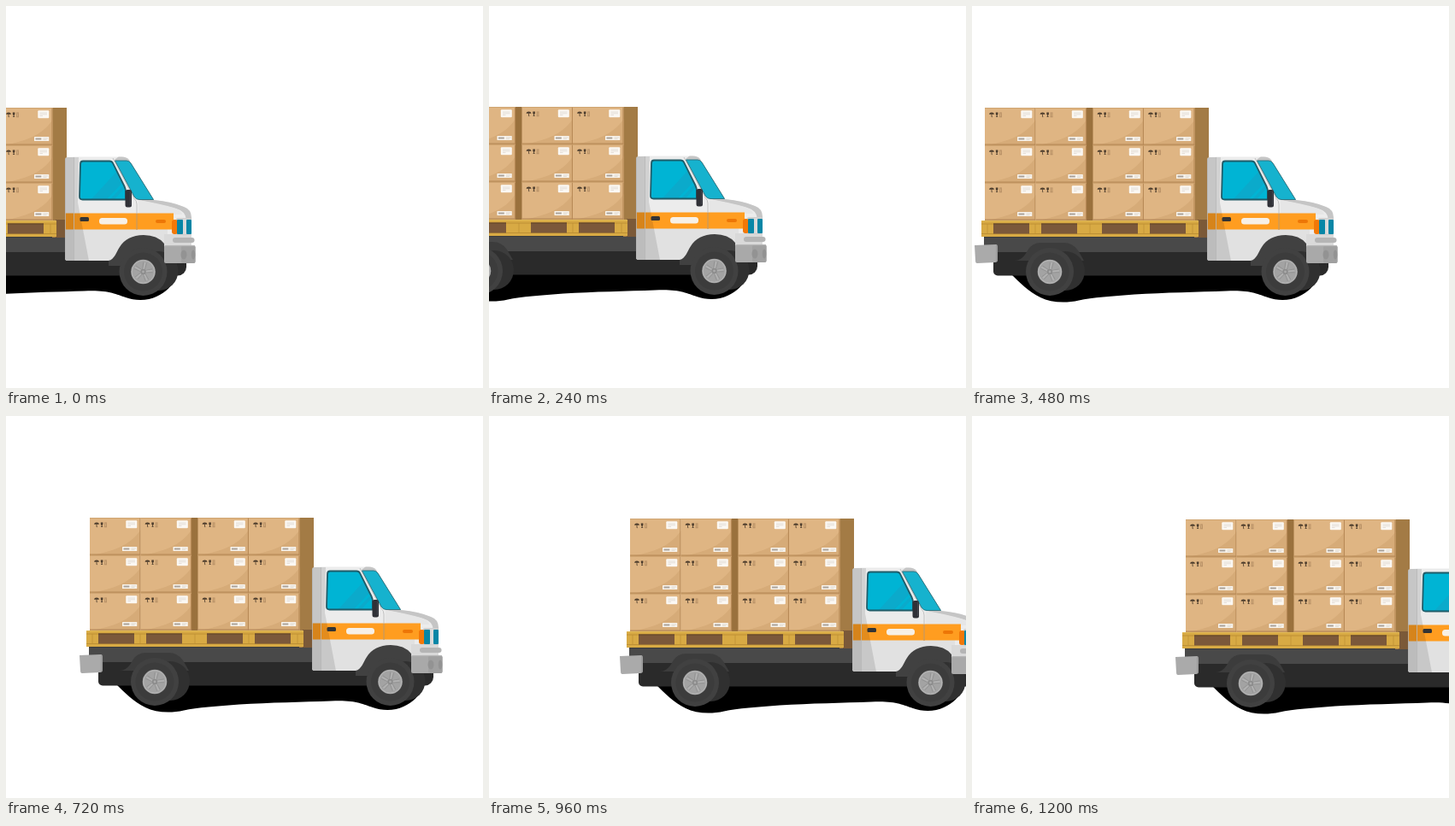
Animation of 558x447 px, one loop 1440 ms. Source, as an HTML page with a canvas:

```html
<!DOCTYPE html>
<html lang="en">
<head>
<meta charset="utf-8">
<title>Delivery truck</title>
<style>
html, body { margin: 0; width: 100%; height: 100%; overflow: hidden; background: #fff; }
canvas { display: block; width: 558px; height: 447px; }
</style>
</head>
<body>
<canvas id="stage" width="558" height="447"></canvas>
<script>
const ctx = document.getElementById('stage').getContext('2d');
const STEP = 240;
// Truck offset held during each step
const stops = [[-206, 0], [-103, -1], [0, 0], [83, 0], [150, 1], [235, 2]];

function rect(x, y, w, h, color, r = 0) {
  ctx.fillStyle = color;
  ctx.beginPath();
  ctx.roundRect(x, y, w, h, r);
  ctx.fill();
}

function shape(d, color) {
  ctx.fillStyle = color;
  ctx.fill(new Path2D(d));
}

function line(d, color, width = 1) {
  ctx.strokeStyle = color;
  ctx.lineWidth = width;
  ctx.stroke(new Path2D(d));
}

function disc(x, y, r, color, ry = r) {
  ctx.fillStyle = color;
  ctx.beginPath();
  ctx.ellipse(x, y, r, ry, 0, 0, Math.PI * 2);
  ctx.fill();
}

function shadow() {
  shape('M45 313C56 324 66 334 80 341C92 347 109 348 125 344.5C140 341 165 339.5 190 337.5' +
    'C225 335.5 265 334.5 297 333.5C325 332 334 337 346 341C357 345 372 345 382 340' +
    'C393 335 401 328 405 314Z', '#000');
}

function icons() {
  shape('M5 7.8Q5.3 5.5 8 5.5Q10.7 5.5 11 7.8Z', '#4d3d2d');
  line('M8 7.5V10.7H8.8', '#4d3d2d', 0.8);
  shape('M12.8 5.5H15.4V7.5Q15 8.7 14.5 8.7V10.2H15.2V11H13V10.2H13.7V8.7Q12.8 8.5 12.8 7.5Z', '#4d3d2d');
  line('M17 6H20M17.7 6.5V10.5M19.4 6.5V10.5M17 10.8H20', '#9a7853', 0.6);
}

function box(x, y) {
  ctx.save();
  ctx.translate(x, y);
  rect(0, 0, 59.5, 44, '#dfb583');
  shape('M59.5 14C51 27 38 36 12 42L4 44H59.5Z', '#d6ab78');
  line('M0 43.2H59.5M59 0V44', '#b88a57', 1.2);
  line('M0 .5H59.5', '#cda16d', 0.8);
  icons();
  rect(42.3, 3.3, 13, 9, '#fbf8f3', 1);
  line('M44.5 6H53M44.5 7.8H53M44.5 9.6H48', '#d3cdc5', 0.6);
  rect(38, 34, 17.3, 5, '#f8f3eb', 0.6);
  line('M39.5 36.5H46.3', '#aaa39b', 2);
  line('M48.5 35.8H54M48.5 37.4H52.5', '#d0c9bf', 0.6);
  ctx.restore();
}

function cargo() {
  rect(260, 119, 17, 152, '#a37b45');
  rect(133, 119, 9, 132, '#9a713d');
  for (const x of [15, 74.5, 141.5, 201])
    for (let row = 0; row < 3; row++) box(x, 119 + row * 44);
  rect(264, 250, 13, 21, '#7b5938');
  rect(11, 251, 254, 19, '#d8aa44');
  line('M11 251.5H265', '#e2ba57');
  line('M11 255H265M11 266.5H265', '#b78a31', 0.8);
  for (const x of [25, 81, 152, 208]) {
    rect(x, 254.5, 42, 12, '#7b583a');
    line(`M${x} 255H${x + 42}`, '#634425');
  }
  line('M18 255V266M74 255V266M138 255V266M201 255V266M258 255V266', '#bd9036', 0.7);
}

function chassis() {
  rect(25, 286, 392, 29.5, '#2a2a2a', [5, 5, 10, 5]);
  rect(14, 270, 263, 18, '#494949');
  line('M14 270.5H275', '#3b3b3b');
  shape('M50 298C57 298 62 292 65 286Q70 277 81 277H107Q118 277 124 286L131 298Z', '#3c3c3c');
  shape('M3 280L28 279Q30 279 30 282V297Q30 300 27 300L6 301Q4 301 4 298Z', '#aaa');
  line('M29 280V299', '#8d8d8d');
}

function wheel(x) {
  disc(x + 18, 310, 23, '#303030');
  disc(x, 311, 28, '#414141');
  disc(x, 311, 22.5, '#3c3c3c');
  disc(x, 311, 14.3, '#a3a3a3');
  ctx.strokeStyle = '#b6b6b6';
  ctx.lineWidth = 1;
  ctx.beginPath();
  ctx.arc(x, 311, 13.3, 0, Math.PI * 2);
  ctx.stroke();
  for (let i = 0; i < 5; i++) {
    ctx.save();
    ctx.translate(x, 311);
    ctx.rotate(i * Math.PI * 0.4 + 0.2);
    line('M-1.3 -3L-2 -11M1.3 -3L2 -11', '#8a8a8a', 0.6);
    line('M0 -3V-11', '#b2b2b2', 1.6);
    ctx.restore();
  }
  disc(x, 311, 3.2, '#8c8c8c');
  disc(x, 311, 1.4, '#aaa');
}

const body = 'M275 180Q275 177 278 177L286 176.5H340Q347 176 350 180L379 227Q400 229 414 235' +
  'Q423 238 423 248V282H391V298H278Q275 298 275 295Z';

function glass() {
  const side = 'M296 181.5H327Q330 181.5 331 184L344.5 211Q346 214 346 218V226.5H295.5Q292 226.5 292 223L293 185Q293 181.5 296 181.5Z';
  shape(side, '#00b4d4');
  ctx.save();
  ctx.clip(new Path2D(side));
  shape('M337 192L304 228H322L347 202V192Z', '#0baacb');
  shape('M347 206L326 228H331L347 211Z', '#0baacb');
  ctx.restore();
  line(side, '#1f5c69', 1.8);
  const front = 'M333.5 181H347Q350 181 352 184L378.5 226.5H362Q358 226.5 356 223Z';
  shape(front, '#16b2ce');
  line(front, '#2d7784', 1);
}

function cab() {
  shape(body, '#ececec');
  ctx.save();
  ctx.clip(new Path2D(body));
  rect(275, 261, 120, 37, '#e1e1e1');
  shape('M338 176H352L379 227H424V250H417Q416 240 405 237Q385 232 361 227L333 180Z', '#c5c5c5');
  shape('M361 227Q385 231 402 236Q411 239 412 244H361Z', '#e6e6e6');
  rect(275, 242.5, 127, 19, '#ff9d20');
  shape('M275 177H291L290 230L303 298H275Z', 'rgba(0,0,0,.11)');
  rect(275, 177, 11, 121, 'rgba(0,0,0,.06)');
  line('M285.5 177V298', '#b9b9b9', 0.8);
  line('M331 178L356 225Q359 228 359 232V262', '#b8b8b8', 0.8);
  line('M359 243V262', '#d18a2c', 0.8);
  rect(391, 267, 34, 16, '#d9d9d9');
  ctx.restore();
  line('M275.5 179V296', '#b7b7b7', 0.8);

  // Wheel arch
  shape('M326 298C333 296.5 335 288 339 282Q347 268.5 367 268Q383 268 391 278V304H326Z', '#414141');

  glass();
  rect(345.5, 215, 7.5, 20.5, '#303137', 2.5);
  line('M351.5 217V233', '#44464d', 1);

  rect(292.5, 247, 10.5, 5, '#343434', 1.5);
  rect(315, 248, 33, 7.5, '#f7f0e6', 3.5);
  rect(381, 250, 12, 4, '#ed7606', 2);

  // Headlights, grille and bumper
  rect(405, 248, 18, 20, '#cfcfcf', 2);
  rect(400, 250, 7, 17, '#f27808', 3);
  rect(406, 250, 7, 17, '#0786a6', 1);
  rect(413, 249, 4, 18, '#dadada');
  rect(417, 250, 6, 17, '#0786a6', 1);
  rect(401, 271, 25.5, 6, '#b5b5b5', 3);
}

function bumper() {
  rect(391, 280, 36.5, 21, '#a9a9a9', 2);
  rect(411, 280.5, 16.5, 20.5, '#a0a0a0', 2);
  line('M392 280.7H427', '#b8b8b8');
  disc(414, 291, 3.5, '#939393', 5.5);
  disc(425, 291, 2.3, '#939393', 5.5);
}

function truck() {
  shadow();
  chassis();
  cargo();
  cab();
  wheel(91);
  wheel(366.5);
  bumper();
}

let last = -1;
function draw(now) {
  const step = Math.floor(now / STEP) % stops.length;
  if (step !== last) {
    last = step;
    ctx.fillStyle = '#fff';
    ctx.fillRect(0, 0, 558, 447);
    ctx.save();
    ctx.translate(...stops[step]);
    truck();
    ctx.restore();
  }
}

const start = performance.now();
function tick() {
  draw(performance.now() - start);
  requestAnimationFrame(tick);
}
tick();
</script>
</body>
</html>
```
